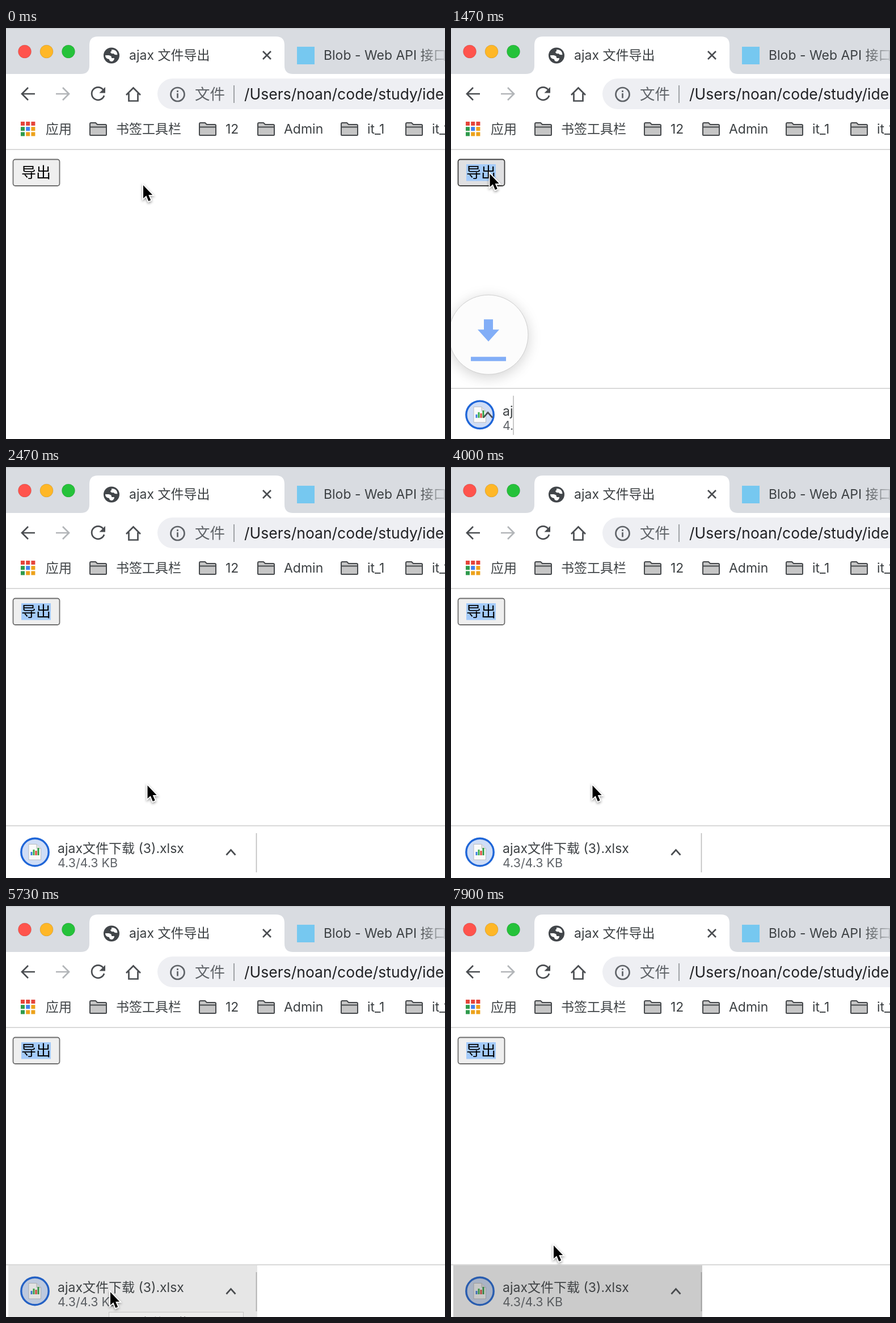
Animation of 774 by 724 pixels, one loop 8 s. Source, as an HTML page:

```html
<!DOCTYPE html>
<html lang="zh-CN">
<head>
<meta charset="utf-8">
<style>
html, body { margin: 0; width: 100%; height: 100%; overflow: hidden; background: #fff; }
svg { display: block; width: 774px; height: 724px; }
text { font: 23px Inter, "Noto Sans CJK SC", "Noto Sans CJK", sans-serif; fill: #3c4043; white-space: pre; }
.line { fill: none; stroke: #4a4d51; stroke-width: 2.7; }
.edge { stroke: #cdcdcd; stroke-width: 1.6; }
</style>
</head>
<body>
<svg viewBox="0 0 774 724">
  <defs>
    <linearGradient id="fade">
      <stop offset="0" stop-color="#d9dce1" stop-opacity="0"/>
      <stop offset="1" stop-color="#d9dce1"/>
    </linearGradient>
    <g id="folder" stroke="#45484b" stroke-width="2" stroke-linejoin="round">
      <path d="M1 22V3Q1 1 3 1H11L14 4H28Q30 4 30 6V22Q30 23 29 23H2Q1 23 1 22Z" fill="#c6c6c6"/>
      <path d="M1 8.500H30"/>
    </g>
    <clipPath id="itemClip"><rect id="itemBox" y="600" width="442" height="200"/></clipPath>
  </defs>

  <!-- tab strip -->
  <rect width="774" height="81" fill="#d9dce1"/>
  <rect width="774" height="1.500" fill="#c9ccd0"/>
  <path d="M132 81Q147 81 147 66V30Q147 15 162 15H476Q491 15 491 30V66Q491 81 506 81Z" fill="#fff"/>
  <g stroke="#000" stroke-opacity=".12">
    <circle cx="33" cy="41.500" r="11.500" fill="#ff544d"/>
    <circle cx="71.500" cy="41.500" r="11.500" fill="#ffb727"/>
    <circle cx="110" cy="41.500" r="11.500" fill="#25c23a"/>
  </g>
  <circle cx="186" cy="48.500" r="14" fill="#42464a"/>
  <path d="M186 38Q196 38 196.500 47Q191 48 190 45Q185 46 184 42Q187 41 186 38ZM175 48H181Q187 49 186 53H191Q191 57 187 59Q182 59 182 55Q175 54 175 48Z" fill="#fff"/>
  <text x="217" y="56">ajax 文件导出</text>
  <path class="line" d="M453 41L467 55M467 41L453 55" stroke="#3c4043"/>
  <rect x="513" y="33" width="31" height="31" fill="#76c8f0"/>
  <text x="560" y="56">Blob - Web API 接口</text>
  <rect x="725" y="30" width="60" height="36" fill="url(#fade)"/>

  <!-- toolbar -->
  <path class="line" d="M51 116H28M39 105L28 116L39 127"/>
  <path class="line" d="M88 116H111M100 105L111 116L100 127" style="stroke:#b2b5b8"/>
  <path class="line" d="M171 108.500A11.200 11.200 0 1 0 173 119"/>
  <path d="M175 104V114.500H164.500Z" fill="#4a4d51"/>
  <path class="line" d="M212 118L224.500 105.500L237 118M216.500 115V128.500H232.500V115"/>
  <rect x="267" y="89" width="560" height="54" rx="27" fill="#eeeff3"/>
  <circle class="line" cx="302.500" cy="117" r="12" style="stroke:#5f6368"/>
  <path class="line" d="M302.500 115V123.500M302.500 110V113" style="stroke:#5f6368"/>
  <text x="333" y="126" style="font-size:26.500px;fill:#5f6368">文件</text>
  <path d="M402 101V132" stroke="#96999d" stroke-width="1.800"/>
  <text x="420" y="126" style="font-size:26.500px;fill:#202124">/Users/noan/code/study/ide</text>

  <!-- bookmarks -->
  <g id="apps"></g>
  <text x="70" y="186">应用</text>
  <use href="#folder" x="147" y="166"/><text x="194" y="186">书签工具栏</text>
  <use href="#folder" x="340" y="166"/><text x="387" y="186">12</text>
  <use href="#folder" x="443" y="166"/><text x="490" y="186">Admin</text>
  <use href="#folder" x="590" y="166"/><text x="637" y="186">it_1</text>
  <use href="#folder" x="704" y="166"/><text x="751" y="186">it_1</text>
  <path class="edge" d="M0 214H774"/>

  <!-- page -->
  <rect id="button" x="12.500" y="231.500" width="82" height="46.500" rx="4" stroke-width="1.800"/>
  <rect id="selection" x="27" y="240" width="52" height="29.500" fill="#a4cbfa"/>
  <text x="27" y="264" style="font-size:26px;fill:#000">导出</text>

  <!-- download shelf -->
  <g id="shelf">
    <rect y="632" width="774" height="100" fill="#fff"/>
    <path class="edge" d="M0 632H774"/>
    <g clip-path="url(#itemClip)">
      <circle cx="51" cy="678.500" r="24.200" fill="#cfddf6" stroke="#1f66d8" stroke-width="3.400"/>
      <path d="M40 664.500H54L61.500 672V692H40Z" fill="#fafafa" stroke="#b9bcc0"/>
      <path d="M54 664.500V672H61.500" fill="#e3e3e3" stroke="#b9bcc0"/>
      <path d="M45 684V678" stroke="#3b7de0" stroke-width="3"/>
      <path d="M49 684V674" stroke="#3bb04a" stroke-width="3"/>
      <path d="M53 684V676" stroke="#e0483c" stroke-width="3"/>
      <path d="M57 684V671" stroke="#2f9e44" stroke-width="3"/>
      <text x="91" y="680">ajax文件下载 (3).xlsx</text>
      <text x="91" y="705" style="font-size:21.400px;fill:#5f6368">4.3/4.3 KB</text>
    </g>
    <g id="itemEnd">
      <path class="line" d="M-53 683.500L-45 674.500L-37 683.500"/>
      <path d="M0 645V714" stroke="#bcbcbc" stroke-width="1.600"/>
    </g>
    <rect id="ink" x="4" y="633" width="439" height="91" fill="#444"/>
  </g>

  <g id="tooltip">
    <rect x="181.500" y="715.500" width="237" height="40" fill="#ececec" stroke="#c4c4c4"/>
    <text x="193" y="742" style="font-size:22px">ajax文件下载 (3).xlsx</text>
  </g>

  <g id="badge">
    <circle r="70" fill="#fbfbfb" stroke="#b5b5b5" style="filter:drop-shadow(0 5px 12px #0004)"/>
    <path d="M-8 -27H8V-9H19L0 12L-19 -9H-8ZM-31 39H31V46.500H-31Z" fill="#4285f4"/>
  </g>

  <path id="cursor" d="M0 0V23L5.300 18.200L9.300 28L13.200 26.300L9.200 17H16.200Z" stroke="#fff" stroke-width="3.600"
    paint-order="stroke" style="filter:drop-shadow(0 2px 2px #0006)"/>
</svg>
<script>
const LOOP = 8000;
const $ = id => document.getElementById(id);
const set = (id, attrs) => { for (const k in attrs) $(id).setAttribute(k, attrs[k]); };
const ramp = (t, start, length) => Math.min(1, Math.max(0, (t - start) / length));
const easeOut = p => 1 - (1 - p) ** 2;
const smooth = p => p * p * (3 - 2 * p);

const [R, G, B, Y] = ['#e5453b', '#2f9a4c', '#4080ee', '#eda21b'];
$('apps').innerHTML = [R, R, R, G, B, Y, G, Y, Y].map((c, i) =>
  `<rect x="${26 + i % 3 * 9.2}" y="${165 + Math.floor(i / 3) * 9.2}" width="7" height="7" fill="${c}"/>`).join('');

// Cursor moves: start, duration, end point
const home = [242, 277];
const moves = [
  [430, 570, 68.5, 257], [1560, 340, 227, 319], [1900, 300, 170, 457],
  [2370, 100, 249.5, 561], [4050, 750, 184, 680], [7300, 580, 181, 598]
];

function cursorAt(t) {
  let [x, y] = home;
  for (const [start, length, toX, toY] of moves) {
    const p = smooth(ramp(t, start, length));
    x += (toX - x) * p;
    y += (toY - y) * p;
  }
  return [x, y];
}

function draw(t) {
  const [x, y] = cursorAt(t);
  set('cursor', { transform: `translate(${x} ${y})` });

  const over = x < 95 && y > 231 && y < 279;
  set('button', { fill: over ? '#e0e0e2' : '#efefef', stroke: over ? '#404040' : '#6f6f6f' });
  set('selection', { opacity: t >= 1270 ? 1 : 0 });

  const end = 4 + 437.5 * easeOut(ramp(t, 1372, 764));
  set('shelf', {
    transform: `translate(0 ${92 * (1 - easeOut(ramp(t, 1372, 120)))})`,
    visibility: t > 1372 ? 'visible' : 'hidden'
  });
  set('itemBox', { width: end });
  set('itemEnd', { transform: `translate(${end} 0)` });
  set('ink', { opacity: 0.134 * ramp(t, 5570, 120) + 0.143 * ramp(t, 6150, 150) });
  set('tooltip', { visibility: t >= 5650 && t < 6150 ? 'visible' : 'hidden' });

  const fall = ramp(t, 1344, 618);
  set('badge', {
    transform: `translate(66 ${509.5 + 149.5 * fall})`,
    opacity: 1 - 4 * (fall - 0.5) ** 2
  });
}

function tick() {
  draw(performance.now() % LOOP);
  requestAnimationFrame(tick);
}
tick();
</script>
</body>
</html>
```
